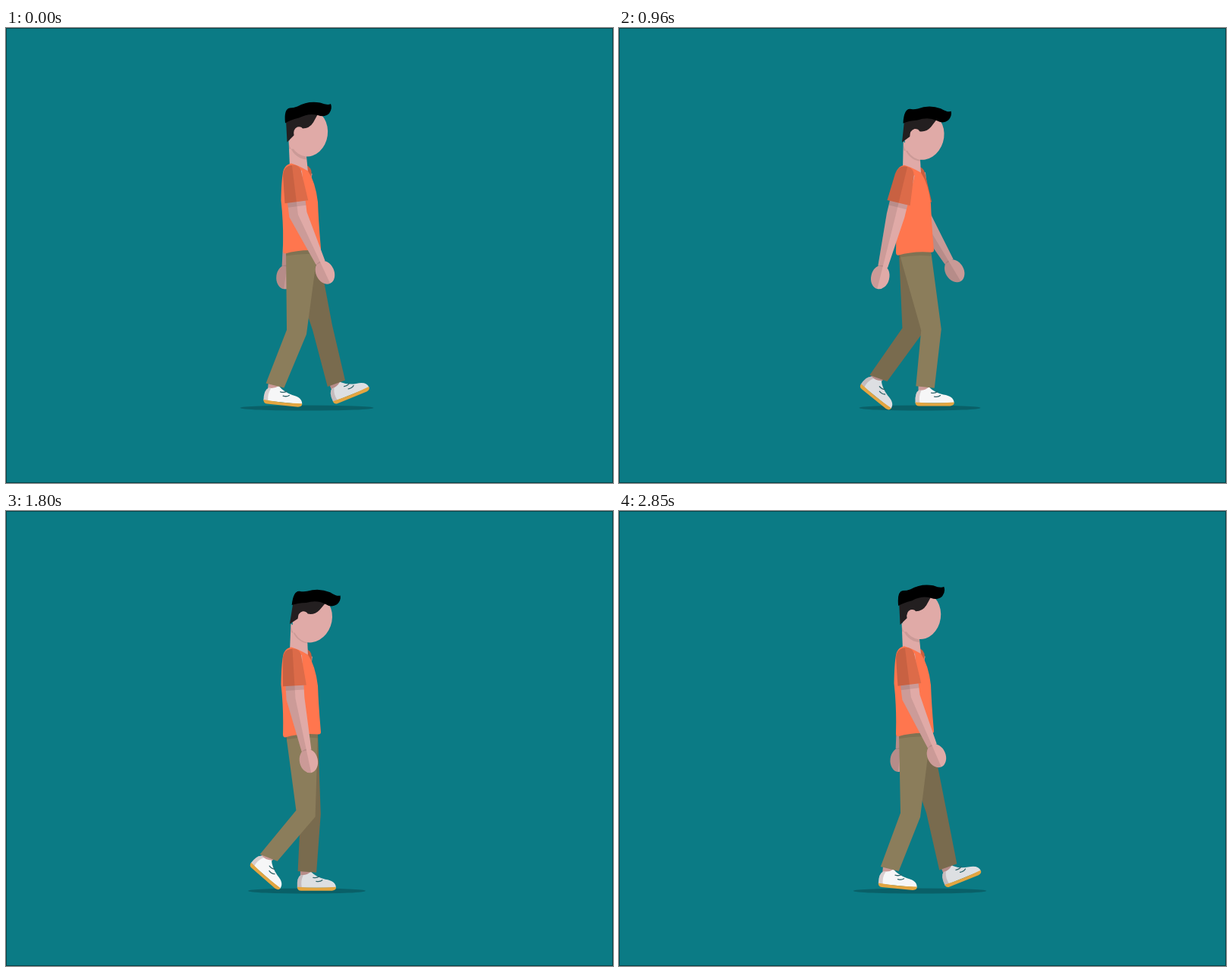
An HTML page for the animation above (2.88 s loop, 800x600 px).

```html
<!DOCTYPE html>
<html lang="en">
<head>
<meta charset="utf-8">
<title>Walk cycle</title>
<style>
  html, body { margin: 0; width: 100%; height: 100%; overflow: hidden; background: #0b7b85; }
  svg { display: block; width: 100vw; height: 100vh; }
  .near { --skin: #e0aaa7; --cloth: #8b7d5b; --shoe: #f6f6f7; --sleeve: #dc6b49; }
  .far { --skin: #c99a97; --cloth: #796b4e; --shoe: #dddfe2; --sleeve: #c75f40; }
  .skin { fill: var(--skin); }
  .cloth { fill: var(--cloth); }
  .shoe { fill: var(--shoe); }
  .sleeve { fill: var(--sleeve); }
  .shirt { fill: #ff764e; }
  .sole { fill: #e3a540; }
  .shade { fill: #000; opacity: .09; }
  .lace { fill: none; stroke: #2d6268; stroke-width: 1.3; stroke-linecap: round; }
</style>
</head>
<body>
<svg viewBox="0 0 800 600">
  <defs>
    <g id="foot">
      <path class="skin" d="M-9-6H6V12H-9Z"/>
      <path class="shade" d="M-9-6H6V12H-9Z"/>
      <g transform="translate(-13 25)">
        <path class="shoe" d="M0-4Q-1-18 5-21Q12-20 18-25Q25-18 37-15Q51-13 51-4Z"/>
        <path d="M0-4Q-1-18 5-21L8-20.5Q4-13 6-4Z" fill="#7a4a4a" opacity=".24"/>
        <path class="sole" d="M0-5Q25-3 51-5Q52-1 46 0H5Q0 0 0-5Z"/>
        <path class="lace" d="M21-17.5q5 1 8-1.5M25-12.5q5 1 8-1.5"/>
      </g>
    </g>
    <g id="hand">
      <ellipse class="skin" rx="12" ry="16"/>
      <path class="shade" d="M0-16A12 16 0 0 0 0 16Z"/>
    </g>
    <g id="sleeve">
      <path class="shade" d="M-12 39H12V46H-12Z"/>
      <path class="sleeve" d="M-13.5 4Q-12-9 0-9Q9-9 11 0L15.5 40H-15.5Z"/>
      <path class="shade" d="M-13.5 4Q-12-9 0-9L0 40H-15.5Z"/>
    </g>
  </defs>

  <ellipse id="shadow" cx="396.5" cy="501" rx="88" ry="3.6" opacity=".22"/>
  <g id="farArm" class="far"></g>
  <g id="farLeg" class="far"></g>
  <g id="nearLeg" class="near"></g>
  <g id="body" class="near">
    <path class="shade" d="M369 293H411.5L411 299Q390 297 369 301Z"/>
    <path id="neck" class="skin"/>
    <path id="chin" class="shade"/>
    <path class="shirt" d="M376 179Q384 181 398 189Q408 204 411 230Q412 258 415 291Q415 294 412 294Q388 292 368 298Q365 298 365 294Q366 260 362.500 228Q363 196 366 187Q369 180 376 179Z"/>
    <g id="head">
      <ellipse class="skin" cx="398.500" cy="139" rx="25.500" ry="31" transform="rotate(8 398.500 139)"/>
      <path d="M369 122L370.500 151L379.500 142Q378 134 384 131Q389 130 391 133Q400 133 405 125L411 114L385 112Z" fill="#231f20"/>
      <path d="M368 126Q366 107 374 106Q379 106 384 104Q398 96 414 99Q424 103 428 100.500Q430.500 107 426 113Q420 119 411 115.500Q399 112 386 119Q374 122 368 126Z"/>
    </g>
  </g>
  <g id="nearArm" class="near"></g>
  <rect x=".5" y=".5" width="799" height="599" fill="none" stroke="#000" opacity=".45"/>
</svg>
<script>
const CYCLE = 1440, STEP = CYCLE / 2, TICK = 30;

// time, knee x, knee y, shin angle, cuff angle, foot angle
const LEG = [
  [0, 383, 401, 22, 14, 6],
  [240, 387, 400, 35.5, 20, 39],
  [360, 395, 399, 40, 21, 41],
  [450, 417, 390, 24, 8, 22],
  [540, 430, 388, 2, -6, -2],
  [690, 416, 395, -12, -20, -22],
  [720, 415, 395, -14, -20, -22],
  [840, 414, 397, -3, -5, -4],
  [960, 411.5, 398, 6, 6, 0],
  [1080, 401.5, 400, 3.5, 4, 0],
  [1260, 391, 400, 12, 4, 3],
  [1410, 384, 401, 21, 14, 5.5]
];

// time, upper arm angle, forearm angle
const ARM = [
  [0, -7, -25],
  [240, -7, -24],
  [360, -3.5, -12],
  [540, 11, 5],
  [690, 13, 13.6],
  [960, 13.6, 14],
  [1260, -3.5, -13.5],
  [1410, -7, -23.5]
];

const $ = id => document.getElementById(id);
const rad = deg => deg * Math.PI / 180;
const wave = t => 2 * Math.PI * t / STEP;
// angles are measured from straight down, positive towards the back
const along = ([x, y], deg, len) => [x - len * Math.sin(rad(deg)), y + len * Math.cos(rad(deg))];
const across = ([x, y], deg, len) => [x + len * Math.cos(rad(deg)), y + len * Math.sin(rad(deg))];
const poly = (cls, pts) =>
  `<path class="${cls}" d="M${pts.map(p => p.map(v => v.toFixed(2))).join("L")}Z"/>`;
const place = (id, [x, y], deg) =>
  `<use href="#${id}" transform="translate(${x} ${y}) rotate(${deg})"/>`;

// periodic smooth curve through the keys
function pose(keys, time) {
  const t = (time % CYCLE + CYCLE) % CYCLE, n = keys.length;
  const key = i => {
    const turn = Math.floor(i / n), k = keys[i - turn * n];
    return [k[0] + turn * CYCLE, ...k.slice(1)];
  };
  let i = n - 1;
  while (keys[i][0] > t) i--;
  const [a, b, c, d] = [key(i - 1), key(i), key(i + 1), key(i + 2)];
  const h = c[0] - b[0], s = (t - b[0]) / h;
  return b.slice(1).map((v, j) => {
    const k = j + 1;
    const m0 = h * (c[k] - a[k]) / (c[0] - a[0]);
    const m1 = h * (d[k] - b[k]) / (d[0] - b[0]);
    const s2 = s * s, s3 = s2 * s;
    return (2 * s3 - 3 * s2 + 1) * v + (s3 - 2 * s2 + s) * m0
      + (3 * s2 - 2 * s3) * c[k] + (s3 - s2) * m1;
  });
}

function leg(time, bob, sway) {
  const [kx, ky, shin, cuff, foot] = pose(LEG, time);
  const dx = -sway * Math.cos(wave(time) / 2);
  const knee = [kx + dx, ky], ankle = along(knee, shin, 76);
  const thigh = Math.atan2(390 - knee[0], ky - 297) * 180 / Math.PI;
  const bend = (thigh + shin) / 2;
  return place("foot", ankle, foot) + poly("cloth", [
    [369, 294 + bob], [411, 292 + bob],
    across(knee, bend, 13.3), across(ankle, cuff, 12.3),
    across(ankle, cuff, -12.3), across(knee, bend, -13.3)
  ]);
}

function arm(time, x, y, lift) {
  const [upper, bend] = pose(ARM, time), fore = bend - lift;
  const joint = [x, y], elbow = along(joint, upper, 57);
  const wrist = along(elbow, fore, 70), hand = along(elbow, fore, 84);
  const mid = (upper + fore) / 2;
  const back = [across(wrist, fore, -6.5), across(elbow, mid, -12), across(joint, upper, -12)];
  const front = [across(joint, upper, 12), across(elbow, mid, 12), across(wrist, fore, 6.5)];
  return poly("skin", [...back, ...front]) + place("hand", hand, fore)
    + poly("shade", [...back, joint, elbow, wrist]) + place("sleeve", joint, upper);
}

function draw(t) {
  const bob = 1.7 * Math.sin(wave(t - 30));
  const nod = 6 * (1 - Math.cos(wave(t)));
  const lean = nod * .25;

  $("shadow").setAttribute("rx", 82.7 + 5.3 * Math.cos(wave(t)));
  $("farArm").innerHTML = arm(t + STEP, 392, 190 + bob, 7);
  $("farLeg").innerHTML = leg(t + STEP, bob, 2);
  $("nearLeg").innerHTML = leg(t, bob, 0);
  $("nearArm").innerHTML = arm(t, 378, 190 + bob, 0);
  $("body").setAttribute("transform", `translate(0 ${bob})`);
  $("head").setAttribute("transform", `rotate(${nod} 384 166)`);
  $("neck").setAttribute("d", `M${372.5 + lean} 148L374 184L398 190L${395.5 + lean / 2} 165Z`);
  $("chin").setAttribute("d",
    `M${372.5 + lean} 152Q${378 + lean} 172 ${396 + lean / 2} 174V160H${373 + lean}Z`);
}

function frame(now) {
  draw(Math.floor(now / TICK) * TICK % (2 * CYCLE));
  requestAnimationFrame(frame);
}

const start = performance.now();
const loop = () => {
  draw(Math.floor((performance.now() - start) / TICK) * TICK % (2 * CYCLE));
  requestAnimationFrame(loop);
};
loop();
</script>
</body>
</html>
```
